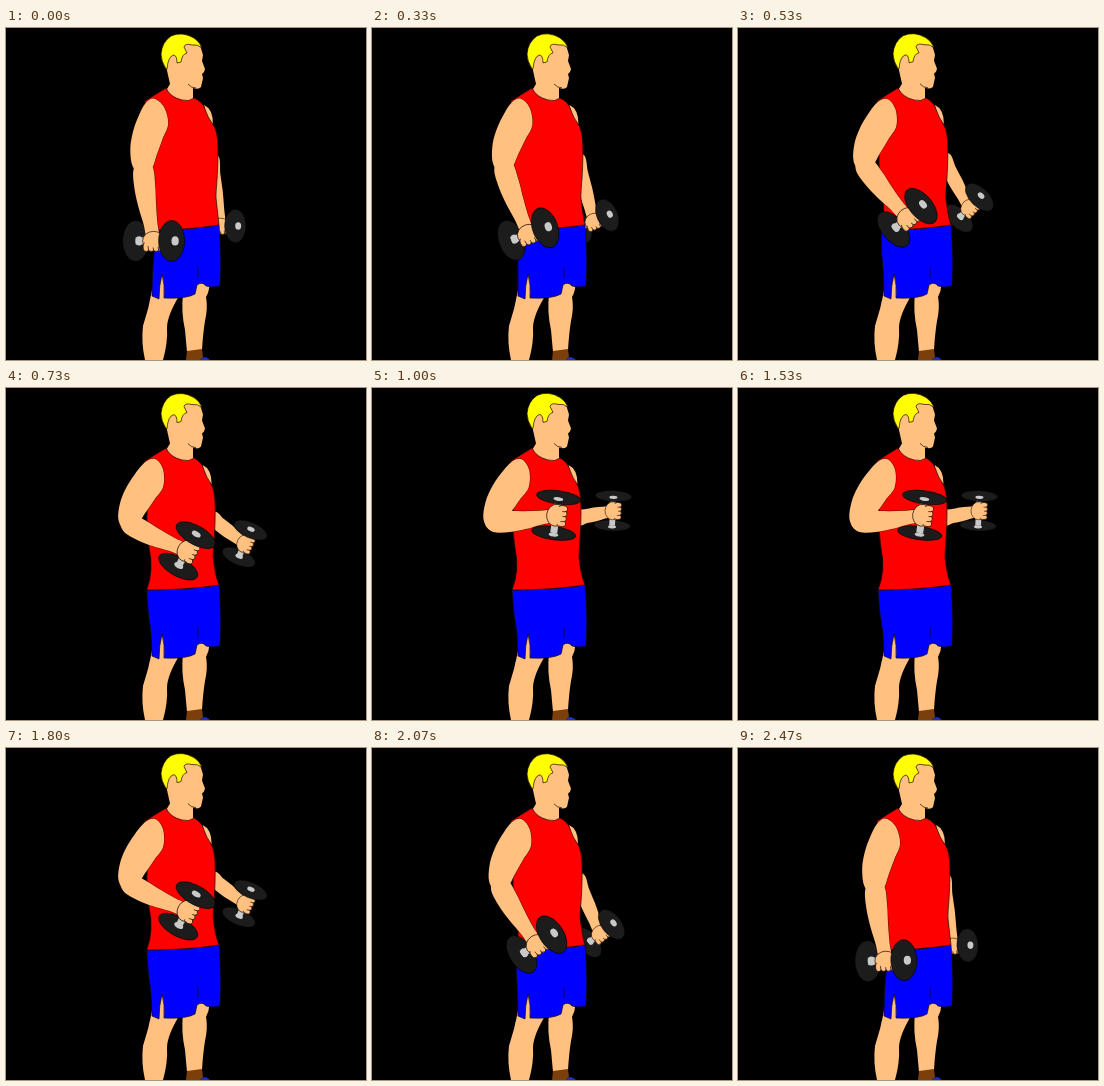
Write an HTML page that moves like this. It is 360 by 332 pixels and loops after 2.54 s.

```html
<!DOCTYPE html>
<html lang="en">
<head>
<meta charset="utf-8">
<title>Hammer curl</title>
<style>
html, body { margin: 0; width: 100%; height: 100%; overflow: hidden; background: #000; }
svg { display: block; width: 100vw; height: 100vh; }
.skin { fill: #ffc080; }
.ink { stroke: #1a0800; stroke-width: .7; stroke-linejoin: round; }
.line { fill: none; }
.plate { fill: #1c1c1c; stroke: #000; stroke-width: .6; }
.steel { fill: #c9c9c9; }
</style>
</head>
<body>
<svg viewBox="0 0 360 332">
  <rect width="360" height="332"/>
  <g id="farArm"></g>
  <path class="skin" d="M146 262Q143 280 137 298Q135 314 139 332H157Q162 314 161 300Q161 288 173 268L160 242Z"/>
  <path class="skin" d="M177 266Q175 284 179 302L181 324L196 322Q197 305 199 293Q202 280 200 269Q204 262 203 255H188Z"/>
  <path fill="#7b3f0c" d="M181 323L196 321L197 329L194 332H180Z"/>
  <path fill="#1c2fc0" d="M194 332Q198 326 204 332Z"/>
  <path id="shorts" class="ink" fill="#00f"/>
  <path class="ink line" d="M192 240V250"/>
  <g id="head">
    <path class="skin" d="M160 38L164 56L158 66L176 80L192 74L187 70L187 60Q193 62 195 59L197 50L196 46L198 44L199 41L196 33L197 27L194 17L176 10L160 22Z"/>
    <path class="ink" fill="#ff0" d="M160 41Q155 33 155 26Q156 14 165 8Q176 3 188 10Q194 14 196 20Q192 16 186 17Q179 15 178 19L181 25Q176 26 175 34L171 35Q171 28 168 27Q162 28 161 41Z"/>
    <path class="ink line" d="M182 56Q185 60 190 60"/>
  </g>
  <path id="sliver" class="skin"/>
  <path id="shirt" class="ink" fill="#f00"/>
  <g id="nearArm"></g>
</svg>
<script>
const LOOP = 2540, FRAMES = 38, DEG = Math.PI / 180;
const $ = id => document.getElementById(id);
const f = v => v.toFixed(2);

// Closed smooth outline through the points.
function blob(pts) {
  const n = pts.length, s = .17;
  let d = 'M' + pts[0].map(f);
  pts.forEach((b, i) => {
    const a = pts[(i + n - 1) % n], c = pts[(i + 1) % n], e = pts[(i + 2) % n];
    const c1 = b.map((v, k) => v + (c[k] - a[k]) * s);
    const c2 = c.map((v, k) => v - (e[k] - b[k]) * s);
    d += 'C' + [...c1, ...c2, ...c].map(f).join(' ');
  });
  return d + 'Z';
}

// Limb from p to q; outer and inner are half-widths spaced evenly along the bone.
function limb(p, q, outer, inner) {
  const len = Math.hypot(q[0] - p[0], q[1] - p[1]);
  const [ux, uy] = [(q[0] - p[0]) / len, (q[1] - p[1]) / len];
  const at = (along, w) => [p[0] + ux * along - uy * w, p[1] + uy * along + ux * w];
  const side = (ws, sign) => ws.map((w, i) => at(len * i / (ws.length - 1), sign * w));
  const cap = outer[0] * .8, end = outer[outer.length - 1] * .7;
  return blob([at(-cap, 0), ...side(outer, 1), at(len + end, 0), ...side(inner, -1).reverse()]);
}

// Outlines first, then fills, so overlapping parts merge into one shape.
const merge = shapes =>
  shapes.map(d => `<path class="ink line" stroke-width="1.4" d="${d}"/>`).join('') +
  shapes.map(d => `<path class="skin" d="${d}"/>`).join('');

const oval = (cls, x, y, rx, ry) =>
  `<ellipse class="${cls}" cx="${f(x)}" cy="${f(y)}" rx="${f(rx)}" ry="${f(ry)}"/>`;

// Arm, fist and dumbbell; the dumbbell's own x axis runs along its bar.
function lifter(hand, shapes, size, tilt, c) {
  const frame = body =>
    `<g transform="translate(${hand.map(f)}) rotate(${f(tilt)}) scale(${size})">${body}</g>`;
  const thin = 13 - 7.5 * c ** 1.5, wide = 20.5 + 2 * c, hub = 3.5 - 6.5 * c * c;
  const plate = x => oval('plate', x, 0, thin, wide) + oval('steel', x + hub, 0, thin * .28, wide * .22);
  let fist = oval('skin ink', 0, 0, 11, 9.5);
  for (let i = 0; i < 4; i++) fist += oval('skin ink', i * 5 - 7.5, 6, 3, 4.5);
  fist += oval('skin', 0, -1, 9.5, 7.5);
  return frame(plate(-18) + `<rect class="steel" x="-18" y="-3.5" width="${f(36 + Math.min(hub, 0))}" height="7"/>`)
    + merge(shapes) + frame(fist + plate(18));
}

// Point on the hand's arc around an elbow; 0 degrees hangs straight down.
const swing = ([x, y], rx, ry, deg) => [x + rx * Math.sin(deg * DEG), y + ry * Math.cos(deg * DEG)];

function draw(t) {
  const c = ((1 - Math.cos(2 * Math.PI * t / LOOP)) / 2) ** 1.08;  // curl, 0 to 1
  const g = 1 - (1 - c) ** 3;                                      // body sway, settles early
  const bend = 10 + 97 * c;

  const elbow = [136.5 - 16 * g, 140 - 5 * g], hand = swing(elbow, 64, 74, bend);
  $('nearArm').innerHTML = lifter(hand, [
    limb([147, 77], elbow, [8, 13, 15.5, 15, 10], [11, 18, 15, 12, 9]),
    limb(elbow, hand, [9, 11, 10, 7.5, 6], [10, 10, 8, 6.5, 6])
  ], 1, -90 * c ** .76, c);

  const farHand = swing([209, 130], 32, 69, bend);
  $('farArm').innerHTML = lifter(farHand, [
    limb([205, 130], farHand, [8, 7, 7, 6, 5], [8, 7, 7, 6, 5])
  ], .82, -95 * c ** .7, c);

  const hip = 152 - 12 * g, side = 212 - 3 * g, neck = 199 - 1.5 * g;
  $('shirt').setAttribute('d', `M160 60Q164 69 176 72Q183 74 188 70Q${f(neck - 2)} 74 ${f(neck)} 81`
    + `Q${f(neck + 3)} 90 ${f(neck + 7)} 95Q${f(side)} 102 ${f(side)} 120C${f(side)} 150 ${f(side - 2)} 158 ${f(side - 2)} 170`
    + `Q${f(side)} 188 213 197Q180 202 ${f(hip)} 202Q148 182 ${f(145 - 2 * g)} 160Q140 142 141 125L143 100L139 73Z`);
  $('sliver').setAttribute('d', `M${f(neck - 1)} 77Q${f(neck + 8)} 81 ${f(neck + 8)} 96L${f(neck + 3)} 94Z`);
  $('shorts').setAttribute('d', `M${f(hip)} 202Q180 202 213 197Q216 230 214 258Q206 260 200 258Q196 253 191 257`
    + `Q190 262 189 266Q181 271 158 270Q159 257 156 246Q153 258 153 271L146 268Q146 245 ${f(hip / 2 + 72)} 226Z`);
  $('head').setAttribute('transform', `translate(0 ${f(-.7 * c)})`);
}

const step = LOOP / FRAMES, begin = performance.now();
let shown = -1;
function tick() {
  const t = (performance.now() - begin) % LOOP;
  const i = Math.floor((t + 9) / step) % FRAMES;
  if (i !== shown) draw((shown = i) * step);
  requestAnimationFrame(tick);
}
tick();
</script>
</body>
</html>
```
